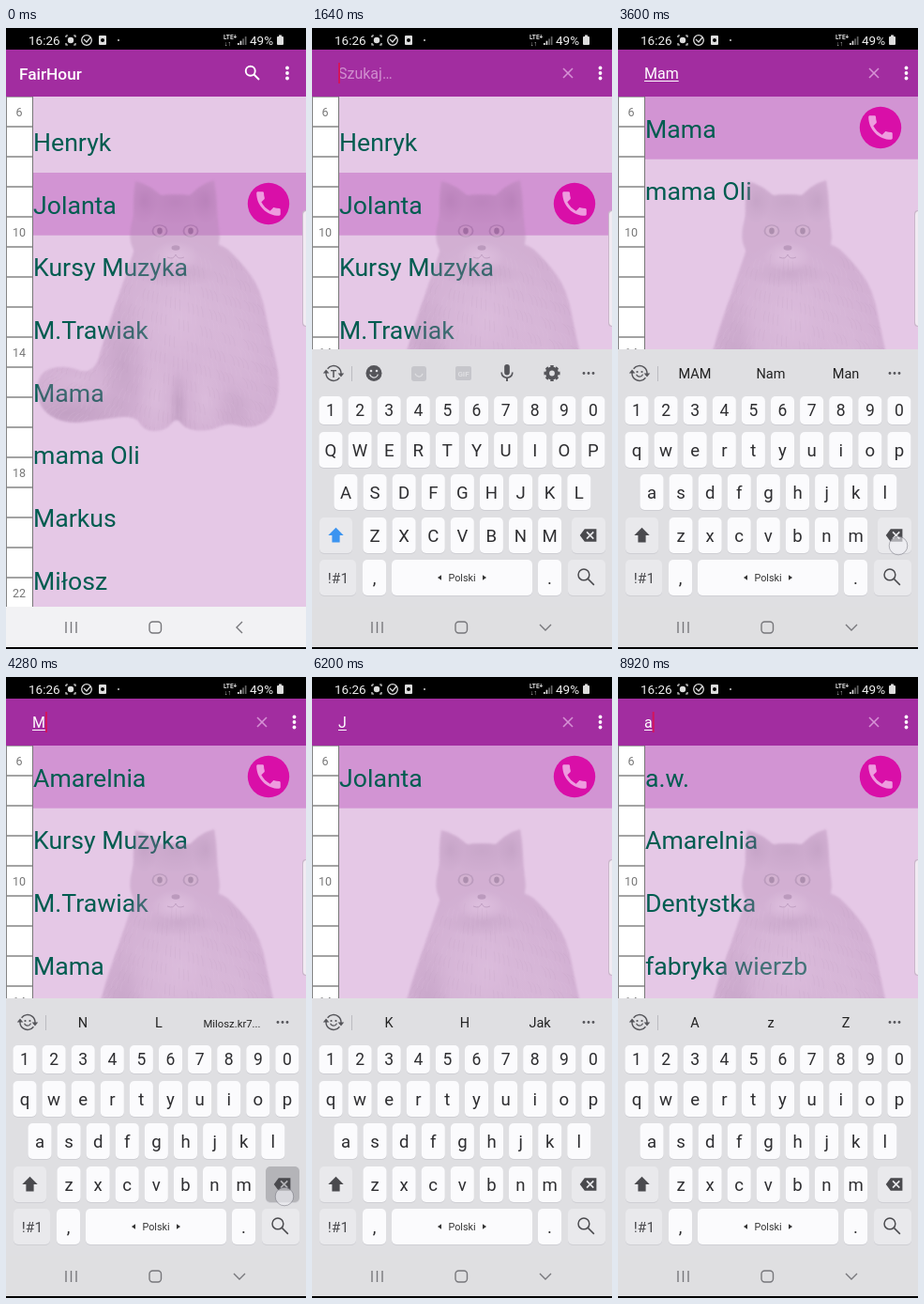
Animation, 320 px wide and 661 px high, one loop 9.16 s. Source, as an HTML page with a canvas:

```html
<!DOCTYPE html>
<html lang="pl">
<head>
<meta charset="utf-8">
<title>Contact search</title>
<style>
html, body { margin: 0; width: 100%; height: 100%; overflow: hidden; background: #000; }
canvas { display: block; width: 320px; height: 661px; }
</style>
</head>
<body>
<canvas id="stage" width="320" height="661"></canvas>
<script>
const LOOP = 9160, OPEN = 640, ROW = 66.7, TOP = 73;
const ctx = document.getElementById('stage').getContext('2d');

const names = ['a.w.', 'Amarelnia', 'Dentystka', 'fabryka wierzb', 'Henryk', 'Jolanta',
  'Kursy Muzyka', 'M.Trawiak', 'Mama', 'mama Oli', 'Markus', 'Miłosz'];
const hints = {
  M: ['N', 'L', 'Milosz.kr7...'], Ma: ['Na', 'Mam', 'Mama'], Mam: ['MAM', 'Nam', 'Man'],
  J: ['K', 'H', 'Jak'], a: ['A', 'z', 'Z']
};
// Query text from each moment on; every entry restarts the cursor blink.
const edits = [[840, ''], [1600, ''], [2020, 'M'], [2360, 'Ma'], [2760, 'Mam'], [3720, 'Ma'],
  [4000, 'M'], [4300, ''], [5600, 'J'], [6660, ''], [7900, 'a']];
// Touches: down, up, x, y, key
const touches = [[480, 640, 262, 48], [1340, 1480, 25, 546, 'shift'], [1880, 2020, 258, 545, 'm'],
  [2240, 2360, 52, 510, 'a'], [2640, 2760, 258, 558, 'm'], [3580, 3720, 299, 551, 'del'],
  [3880, 4000, 299, 551, 'del'], [4180, 4300, 297, 553, 'del'], [4820, 4960, 14, 544, 'shift'],
  [5400, 5600, 222, 499, 'j'], [6540, 6660, 290, 542, 'del'], [7760, 7900, 38, 515, 'a']];

const keys = [];
function addRow(labels, x, y, h) {
  [...labels].forEach((c, i) => keys.push({ c, x: x + i * 31.1, y, w: 25, h }));
}
addRow('1234567890', 20, 407, 30);
addRow('qwertyuiop', 20, 449, 38);
addRow('asdfghjkl', 36, 494, 38);
addRow('zxcvbnm', 67, 540, 38);
for (const [c, x, y, w] of [['shift', 25.5, 540, 35], ['del', 295, 540, 36], ['!#1', 27.5, 585, 39],
  [',', 66.5, 585, 25], ['space', 160, 585, 150], ['.', 253.5, 585, 25], ['find', 293, 585, 40]])
  keys.push({ c, x, y, w, h: 38 });

const shapes = {
  phone: 'M6.62 10.79c1.44 2.83 3.76 5.14 6.59 6.59l2.2-2.2c.27-.27.67-.36 1.02-.24 1.12.37 2.33.57 3.57.57.55 0 1 .45 1 1V20c0 .55-.45 1-1 1-9.39 0-17-7.61-17-17 0-.55.45-1 1-1h3.5c.55 0 1 .45 1 1 0 1.25.2 2.45.57 3.57.11.35.03.74-.25 1.02z',
  mic: 'M12 14a3 3 0 003-3V5a3 3 0 00-6 0v6a3 3 0 003 3zM17.3 11a5.3 5.3 0 01-10.6 0H5a7 7 0 006 6.7V21h2v-3.3A7 7 0 0019 11z',
  del: 'M22 4H7L1 12l6 8h15zM19 15.6 17.6 17 14 13.4 10.4 17 9 15.6 12.6 12 9 8.4 10.4 7 14 10.6 17.6 7 19 8.4 15.4 12z',
  shift: 'M12 2 2 12h5v9h10v-9h5z'
};

function icon(name, x, y, scale, color) {
  ctx.save();
  ctx.translate(x, y);
  ctx.scale(scale, scale);
  ctx.translate(-12, -12);
  ctx.fillStyle = color;
  ctx.fill(new Path2D(shapes[name]), 'evenodd');
  ctx.restore();
}
function rect(x, y, w, h, color) {
  ctx.fillStyle = color;
  ctx.fillRect(x, y, w, h);
}
function box(x, y, w, h, r, color) {
  ctx.beginPath();
  ctx.roundRect(x, y, w, h, r);
  ctx.fillStyle = color;
  ctx.fill();
}
function dot(x, y, r, color) {
  ctx.beginPath();
  ctx.arc(x, y, r, 0, 7);
  ctx.fillStyle = color;
  ctx.fill();
}
function ring(x, y, r, color, width = 1.5, from = 0, to = Math.PI * 2) {
  ctx.beginPath();
  ctx.arc(x, y, r, from, to);
  ctx.strokeStyle = color;
  ctx.lineWidth = width;
  ctx.stroke();
}
function line(color, width, ...p) {
  ctx.beginPath();
  for (let i = 0; i < p.length; i += 2) ctx.lineTo(p[i], p[i + 1]);
  ctx.strokeStyle = color;
  ctx.lineWidth = width;
  ctx.stroke();
}
function text(s, x, y, size, color, align = 'left', weight = 400) {
  ctx.font = `${weight} ${size}px Roboto, sans-serif`;
  ctx.textAlign = align;
  ctx.fillStyle = color;
  ctx.fillText(s, x, y);
}
function lens(x, y, r, color, width) {
  ring(x - r * .35, y - r * .35, r, color, width);
  line(color, width, x + r * .4, y + r * .4, x + r * 1.5, y + r * 1.5);
}
function dots(x, y, dx, dy, r, color) {
  for (let i = -1; i <= 1; i++) dot(x + i * dx, y + i * dy, r, color);
}

// Smooth closed outline through a few points
function outline(...p) {
  const path = new Path2D(), n = p.length;
  for (let i = 0; i <= n; i += 2) {
    const [x, y, u, v] = [0, 1, 2, 3].map(k => p[(i + k) % n]);
    if (i) path.quadraticCurveTo(x, y, (x + u) / 2, (y + v) / 2);
    else path.moveTo((x + u) / 2, (y + v) / 2);
  }
  return path;
}

// The cat is painted once, then laid translucently over the list and its text.
function makeCat() {
  const layer = document.createElement('canvas');
  layer.width = 320;
  layer.height = 661;
  const c = layer.getContext('2d');
  const body = outline(140, 225, 225, 225, 250, 248, 272, 278, 282, 330, 293, 375, 286, 414, 262, 427,
    236, 420, 218, 429, 192, 428, 182, 414, 170, 429, 147, 429, 138, 412, 100, 417, 62, 422, 34, 404,
    33, 368, 60, 358, 94, 370, 106, 325, 120, 285, 134, 245);
  const head = outline(139, 188, 162, 177, 200, 177, 221, 188, 231, 228, 214, 250, 182, 262, 148, 250, 129, 228);
  const ears = new Path2D('M136 210Q135 175 138 163Q155 166 171 184ZM226 210Q225 175 222 162Q205 166 191 184Z');
  c.filter = 'blur(1px)';
  c.fillStyle = '#af83af';
  for (const part of [body, ears, head]) c.fill(part);
  c.filter = 'none';
  c.globalCompositeOperation = 'source-atop';

  function glow(x, y, rx, ry, rgb, alpha) {
    c.save();
    c.translate(x, y);
    c.scale(rx, ry);
    const g = c.createRadialGradient(0, 0, 0, 0, 0, 1);
    g.addColorStop(0, `rgba(${rgb},${alpha})`);
    g.addColorStop(1, `rgba(${rgb},0)`);
    c.fillStyle = g;
    c.fillRect(-1, -1, 2, 2);
    c.restore();
  }
  const light = '216,186,216', dark = '104,62,108';
  glow(185, 310, 75, 85, light, .65);
  glow(250, 345, 42, 90, light, .35);
  for (const x of [160, 212]) glow(x, 395, 22, 50, light, .6);
  glow(75, 375, 45, 22, light, .4);
  glow(65, 410, 75, 28, dark, .6);
  glow(125, 355, 25, 75, dark, .4);
  glow(184, 405, 10, 45, dark, .55);
  glow(245, 405, 20, 30, dark, .3);
  glow(182, 262, 45, 14, dark, .35);
  glow(181, 185, 40, 24, dark, .35);
  glow(147, 184, 15, 24, dark, .4);
  glow(213, 184, 15, 24, dark, .4);
  glow(181, 243, 26, 16, light, .8);

  for (let i = 0; i < 700; i++) {
    const x = 30 + i * 97.3 % 262, y = 240 + i * 61.7 % 186, lean = (x - 182) / 12;
    c.strokeStyle = `rgba(${i % 2 ? light : dark},.16)`;
    c.beginPath();
    c.moveTo(x, y);
    c.quadraticCurveTo(x + lean, y + 4, x + lean, y + 12);
    c.stroke();
  }
  function oval(x, y, rx, ry, color) {
    c.beginPath();
    c.ellipse(x, y, rx, ry, 0, 0, 7);
    c.fillStyle = color;
    c.fill();
  }
  for (const x of [164, 197]) {
    oval(x, 216, 8.5, 6.8, '#714a75');
    oval(x, 216, 6.6, 5.6, '#b48cab');
    oval(x, 216, 2.8, 3.4, '#452548');
  }
  oval(181, 234, 4.5, 2.8, '#6f4673');
  c.strokeStyle = '#7d5581';
  c.stroke(new Path2D('M172 244Q179 247 181 241Q183 247 190 244'));
  return layer;
}
const cat = makeCat();

function drawStatus() {
  rect(0, 0, 320, 23, '#000');
  text('16:26', 24, 18, 13.5, '#eee');
  ctx.setLineDash([4, 6]);
  ctx.lineDashOffset = 2;
  line('#ddd', 1.2, 64, 8, 74, 8, 74, 18, 64, 18, 64, 8);
  ctx.setLineDash([]);
  dot(69, 13, 3.2, '#ddd');
  ring(86, 13, 5.3, '#ddd', 1.3);
  line('#ddd', 1.3, 83, 12, 86, 15, 90, 10);
  box(99, 8, 8, 10, 1, '#ddd');
  dot(103, 13, 2, '#000');
  dot(120, 13, 1, '#ccc');
  text('LTE+', 232, 12, 6.5, '#ddd', 'left', 700);
  text('↓↑', 233, 19, 7, '#ddd');
  for (let i = 0; i < 4; i++) rect(247 + i * 2.6, 16 - i * 2.3, 1.7, 2 + i * 2.3, i < 2 ? '#ddd' : '#666');
  text('49%', 260, 18, 13.5, '#eee');
  box(289, 9, 7, 9, 1, '#ddd');
  rect(291, 7.5, 3, 2, '#ddd');
}

function drawToolbar(t, query, since) {
  rect(0, 23, 320, 50, '#a22da0');
  if (t < OPEN) {
    text('FairHour', 14, 55, 17.3, '#fff', 'left', 500);
    lens(262.5, 47.5, 5, '#fff', 1.9);
    dots(300, 48, 0, 5.5, 1.9, '#fff');
  } else {
    text(query || 'Szukaj…', 28, 54, 16, query ? '#fff' : '#d08fcf');
    const end = 28 + (query ? ctx.measureText(query).width : 0);
    if (query) rect(28, 56, end - 28, 1, '#fff');
    if (since % 1000 < 500) rect(end, 37, 2, 22, '#d3145c');
    line('#d591d4', 1.6, 268, 43, 278, 53);
    line('#d591d4', 1.6, 278, 43, 268, 53);
    dots(307.5, 48, 0, 5.5, 1.9, '#fff');
  }
  if (t > 480 && t < 760)
    dot(262, 48, Math.min(20, 8 + (t - 480) / 12), `rgba(255,255,255,${.25 * Math.min(1, (760 - t) / 120)})`);
}

function drawList(t, query) {
  rect(0, TOP, 320, 543, '#e5c8e6');
  const filtered = t >= edits[2][0];
  const rows = filtered ? names.filter(n => n.toLowerCase().includes(query.toLowerCase())) : names.slice(4);
  const first = filtered ? TOP : 87.3, active = filtered ? 0 : 1;
  const top = first + active * ROW;
  rect(28, top, 292, ROW, '#d294d3');
  rows.forEach((n, i) => {
    if (i < 8) text(n, 29, first + i * ROW + 43.5, 26.67, '#005c50');
  });
  ctx.globalAlpha = .35;
  ctx.drawImage(cat, 0, 0);
  ctx.globalAlpha = 1;
  dot(280, top + 33, 22.2, '#d90fa8');
  icon('phone', 280, top + 33, 1.42, '#ee9bdf');
  rect(0, TOP, 28, 543, '#fff');
  for (let i = 0; i < 17; i++) {
    rect(0, TOP - .75 + i * 32, 29, 1.5, '#858585');
    if (i % 4 === 0) text(6 + i, 14, 94 + i * 32, 12.5, '#777', 'center');
  }
  rect(0, TOP, 1, 543, '#858585');
  rect(28, TOP, 1, 543, '#777');
  box(316, 194, 8, 124, 4, '#c9b6ca');
  box(317, 195, 8, 122, 4, '#f1eaf2');
}

function drawHints(query) {
  const dark = '#55555a', pale = '#c6c6cb', paper = '#dfdfe2';
  // Two arrows going round
  for (const turn of [0, Math.PI]) {
    ctx.save();
    ctx.translate(23, 367.5);
    ctx.rotate(turn);
    ring(0, 0, 8, dark, 1.4, -2.5, .1);
    ctx.beginPath();
    for (const [x, y] of [[4.6, 0], [11.2, 0], [8, 4]]) ctx.lineTo(x, y);
    ctx.fillStyle = dark;
    ctx.fill();
    ctx.restore();
  }
  rect(42, 360, 1, 16, '#bbbbc0');
  dots(295, 367.5, 5, 0, 1.4, dark);
  if (query) {
    dot(20.5, 366, 1.1, dark);
    dot(25.5, 366, 1.1, dark);
    ring(23, 367.5, 3.6, dark, 1.2, .3, 2.8);
    hints[query].forEach((h, i) =>
      text(h, [82, 163, 241][i] + (i === 2 && h.length < 7 ? 2 : 0), 373, h.length > 7 ? 11.3 : 14.5, '#222', 'center'));
    return;
  }
  text('T', 23, 371.5, 10.5, dark, 'center', 700);
  dot(66, 367.5, 8.5, dark);
  dot(63, 365, 1.3, paper);
  dot(69, 365, 1.3, paper);
  ring(66, 367.5, 4.5, paper, 1.3, .25, 2.9);
  box(106, 360, 16, 16, 3, pale);
  ring(114, 367, 4, paper, 1.3, .2, 2.9);
  box(153, 360, 17, 15, 2, pale);
  text('GIF', 161.5, 371, 8, paper, 'center', 700);
  icon('mic', 208, 367.5, .95, dark);
  ring(256, 367.5, 4.9, dark, 4);
  for (let i = 0; i < 8; i++) ring(256, 367.5, 7.4, dark, 2.4, i * Math.PI / 4 - .22, i * Math.PI / 4 + .22);
}

function drawKeyboard(t, query, caps) {
  const slide = Math.min(1, (t - 680) / 360);
  if (slide <= 0) return;
  ctx.save();
  ctx.beginPath();
  ctx.rect(0, 73, 320, 543);
  ctx.clip();
  ctx.translate(0, 274 * (1 - slide) ** 3);
  rect(0, 342, 320, 274, '#dfdfe2');
  drawHints(query);
  const label = c => caps ? c.toUpperCase() : c;
  for (const { c, x, y, w, h } of keys) {
    const held = touches.some(p => p[4] === c && t >= p[0] + 40 && t < p[1]);
    const special = ['shift', 'del', '!#1', 'find'].includes(c);
    box(x - w / 2, y - h / 2 + 1, w, h, 5, '#cfcfd4');
    box(x - w / 2, y - h / 2, w, h, 5, held ? '#b4b4b8' : special ? '#e9e9ec' : '#fbfbfd');
    if (c === 'shift') icon(c, x, y, .82, caps ? '#3c94f0' : '#4a4a4e');
    else if (c === 'del') icon(c, x, y, .84, '#4a4a4e');
    else if (c === 'find') lens(x - 1, y - 1, 5.9, '#4a4a4e', 1.5);
    else if (c === 'space') {
      text('Polski', x, y + 3.5, 10.8, '#333', 'center');
      for (const d of [-1, 1]) {
        ctx.beginPath();
        for (const [px, py] of [[26, 0], [22, -2.7], [22, 2.7]]) ctx.lineTo(x + d * px, y + py);
        ctx.fill();
      }
    } else if (c === '!#1') text(c, x + .5, y + 5.5, 15.5, '#4a4a4e', 'center');
    else text(label(c), x, y + (h < 38 ? 6 : 6.5), h < 38 ? 17.5 : 18.6, '#2e2e31', 'center');
  }
  for (const [down, up, , , c] of touches) {
    if (!c || c.length > 1 || t < down || t >= up + 120) continue;
    const { x, y } = keys.find(k => k.c === c);
    ctx.save();
    ctx.shadowColor = 'rgba(0,0,0,.3)';
    ctx.shadowBlur = 3;
    ctx.shadowOffsetY = 1;
    box(x - 23.5, y - 92, 47, 60.5, 8, '#fbfbfd');
    ctx.restore();
    // The bubble keeps the case it was typed in.
    const upper = down === 1880 || c === 'j';
    text(upper ? c.toUpperCase() : c, x, y - 48.5, 35, '#252528', 'center');
  }
  ctx.restore();
}

function drawNav(t) {
  const k = Math.max(0, Math.min(1, (t - 680) / 240));
  const g = Math.round(242 - 19 * k);
  rect(0, 616, 320, 43, `rgb(${g},${g},${g + 2})`);
  rect(0, 659, 320, 2, '#000');
  for (const x of [64, 69.5, 75]) line('#77777b', 1.4, x, 632, x, 644);
  ctx.beginPath();
  ctx.roundRect(153, 632, 12.5, 12, 3.5);
  ctx.stroke();
  ctx.save();
  ctx.translate(249, 638);
  ctx.rotate(-Math.PI / 2 * k);
  line('#77777b', 1.4, 3, -6, -3, 0, 3, 6);
  ctx.restore();
}

function drawTouches(t) {
  for (const [down, up, x, y] of touches) {
    if (t < down || t > up + 120) continue;
    ctx.globalAlpha = t < up ? 1 : 1 - (t - up) / 120;
    dot(x, y, 9.5, 'rgba(240,240,245,.6)');
    ring(x, y, 9.8, 'rgba(130,130,140,.6)', 1);
    ctx.globalAlpha = 1;
  }
}

function frame(now) {
  const t = now % LOOP;
  const at = time => edits.filter(e => e[0] <= time).pop() || edits[0];
  const [time, query] = at(t);
  const caps = (t >= 1440 && t < 2020) || (t >= 4920 && t < 5600);
  drawList(t, query);
  drawStatus();
  drawToolbar(t, query, Math.max(0, t - time));
  drawKeyboard(t, at(t - 120)[1], caps);
  drawNav(t);
  drawTouches(t);
  requestAnimationFrame(frame);
}
requestAnimationFrame(frame);
</script>
</body>
</html>
```
